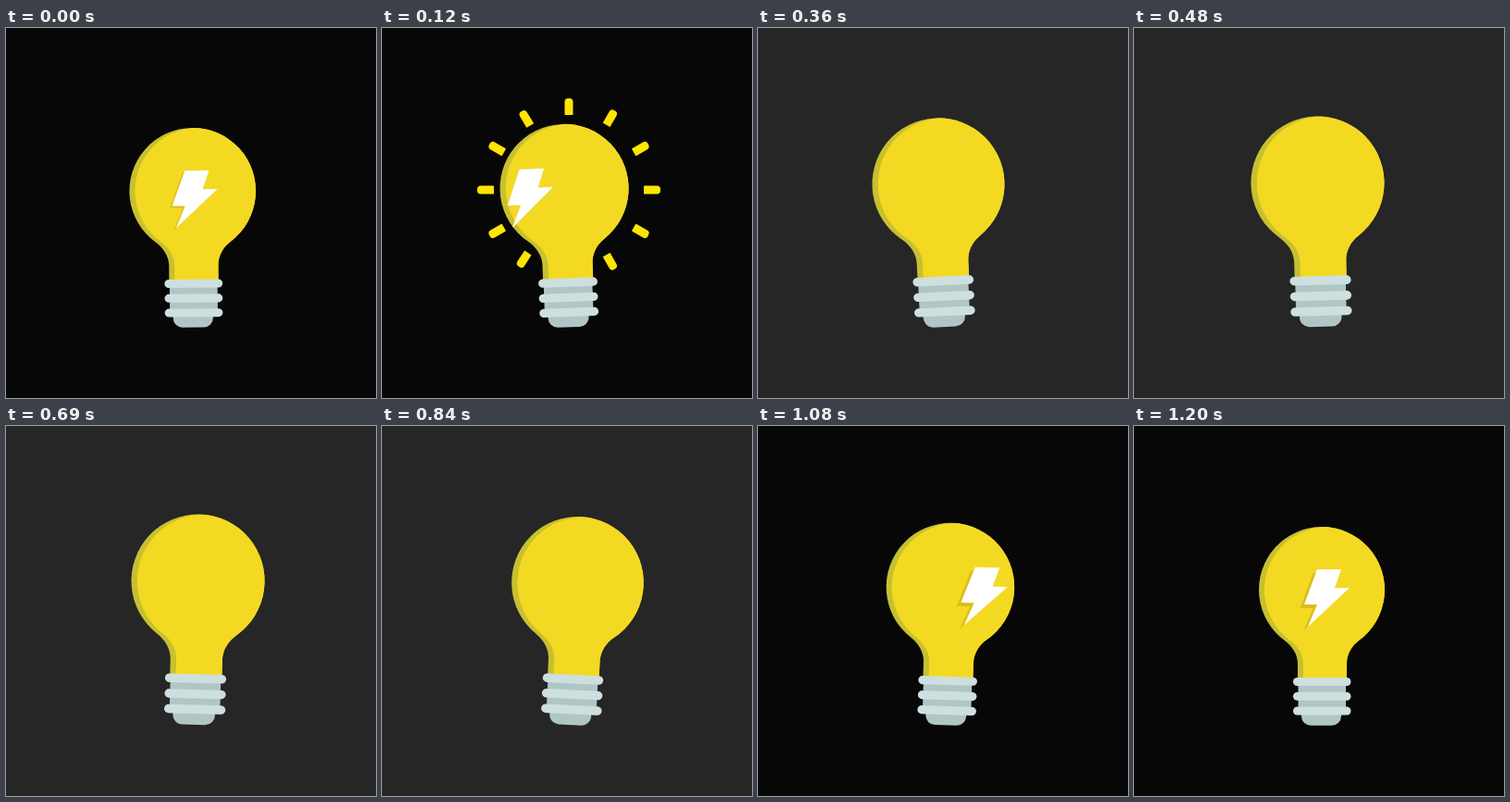
These frames come from a looping animation (400 by 400 pixels, 1230 ms). An HTML page with a canvas:

```html
<!DOCTYPE html>
<html lang="en">
<head>
<meta charset="utf-8">
<title>Swaying light bulb</title>
<style>
  html, body { margin: 0; height: 100%; overflow: hidden; background: #070707; }
  canvas { display: block; width: 100vw; height: 100vh; }
</style>
</head>
<body>
<canvas width="400" height="400"></canvas>
<script>
const ctx = document.querySelector('canvas').getContext('2d');
const LOOP = 1230, STEP = 30;
const PIVOT = { x: 203, y: 337 };
const RAY_CENTRE = { x: 202, y: 175 };
const RAY_ANGLES = [-90, -60, -30, 0, 30, 60, 123, 150, 180, 210, 239];

const glass = new Path2D(
  'M163 232C171 238 177 247 177 257V276H230V257C230 247 235 238 243 232A68 68 0 1 0 163 232Z');
const bolt = new Path2D('M198 155H224L217 175H233L188 217L198 193H184Z');

function fillPath(path, color, dx = 0, dy = 0) {
  ctx.save();
  ctx.translate(dx, dy);
  ctx.fillStyle = color;
  ctx.fill(path);
  ctx.restore();
}

function box(x, y, w, h, radii, color) {
  ctx.fillStyle = color;
  ctx.beginPath();
  ctx.roundRect(x, y, w, h, radii);
  ctx.fill();
}

function drawRays(p) {
  const x = (p - 90) / 300;
  if (x <= 0 || x >= 1) return;
  const outer = 80 + 68 * x * (1.5 - 0.5 * x);
  const inner = Math.max(80, outer - 0.075 * (390 - p));
  const length = outer - inner;
  const width = inner > 82 ? Math.min(9, length) : 9;
  const round = Math.min(4, length * 0.28);
  const innerRound = inner > 82 ? round : 0.5;
  for (const angle of RAY_ANGLES) {
    ctx.save();
    ctx.translate(RAY_CENTRE.x, RAY_CENTRE.y);
    ctx.rotate(angle * Math.PI / 180);
    box(inner, -width / 2, length, width, [innerRound, round, round, innerRound], '#ffe500');
    ctx.restore();
  }
}

function drawBulb(p) {
  const swing = Math.sin(2 * Math.PI * p / LOOP);
  const size = 1 + 0.062 * Math.sin(Math.PI * p / LOOP);
  ctx.save();
  ctx.translate(PIVOT.x, PIVOT.y);
  ctx.rotate(-3 * swing * Math.PI / 180);
  ctx.scale(size, size);
  ctx.translate(-PIVOT.x, -PIVOT.y);

  fillPath(glass, '#c7c030');
  ctx.save();
  ctx.clip(glass);
  fillPath(glass, '#f4d922', 6);

  // The bolt leaves on the left and comes back in from the right.
  const q = p < LOOP / 2 ? p : p - LOOP;
  const dx = -Math.sign(q) * 0.385 * (Math.hypot(q, 50) - 50);
  const depth = 4.5 * Math.min(1, Math.max(0, 1 - q / 60));
  fillPath(bolt, '#dcbe1c', dx - depth, depth * 0.9);
  fillPath(bolt, '#fff', dx);
  ctx.restore();

  box(177.5, 273, 51.5, 39, 0, '#b0c6c5');
  box(181, 308, 43, 15.7, [0, 0, 10, 10], '#b0c6c5');
  for (const y of [272, 287.8, 303.5]) box(172, y, 62.5, 9, 4.5, '#cddfdf');
  ctx.restore();
}

function draw() {
  const t = Math.floor(performance.now() % LOOP / STEP) * STEP;
  const p = t + STEP;
  const glow = Math.sin(Math.PI * p / LOOP);
  ctx.fillStyle = glow < 0.39 ? '#070707' : glow < 0.775 ? '#181818' : '#262626';
  ctx.fillRect(0, 0, 400, 400);
  drawRays(p);
  drawBulb(p);
  requestAnimationFrame(draw);
}
draw();
</script>
</body>
</html>
```
